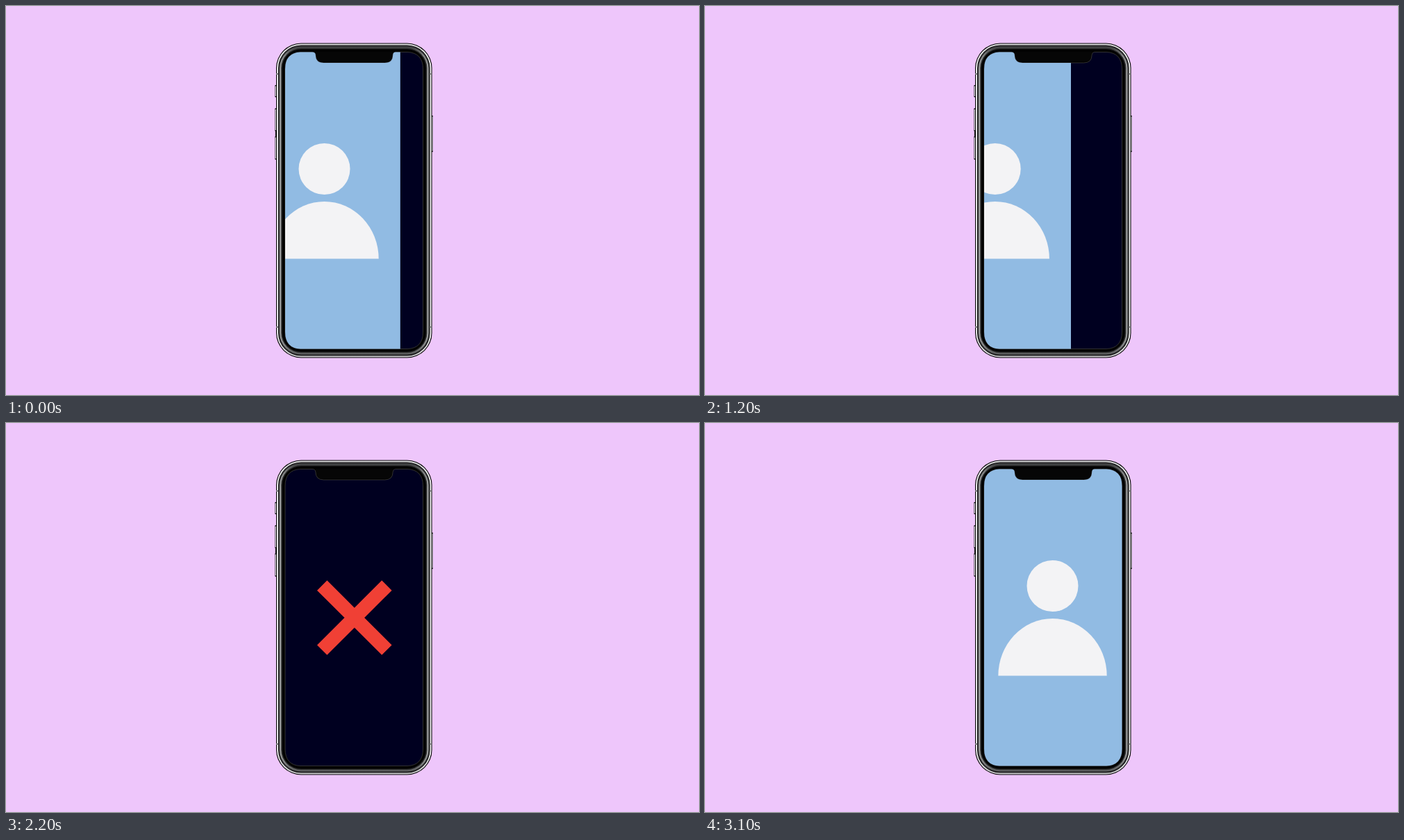
These frames come from a looping animation (998 px wide and 561 px high, 3.5 s). An HTML page:

```html
<!DOCTYPE html>
<html lang="en">
<head>
<meta charset="utf-8">
<title>Phone swipe</title>
<style>
  html, body { margin: 0; width: 100%; height: 100%; overflow: hidden; background: #eec6fb; }
  svg { display: block; width: 100%; height: 100%; }
</style>
</head>
<body>
<svg viewBox="0 0 998 561">
  <defs>
    <linearGradient id="steel" x2="0" y2="1">
      <stop offset="0" stop-color="#d8d8da"/>
      <stop offset=".06" stop-color="#f4f4f5"/>
      <stop offset=".94" stop-color="#f0f0f1"/>
      <stop offset="1" stop-color="#c8c8ca"/>
    </linearGradient>
    <linearGradient id="rim" x2="0" y2="1">
      <stop offset="0" stop-color="#3c3d3e"/>
      <stop offset=".03" stop-color="#8b8c8d"/>
      <stop offset=".08" stop-color="#a2a3a4"/>
      <stop offset=".92" stop-color="#a2a3a4"/>
      <stop offset=".97" stop-color="#8b8c8d"/>
      <stop offset="1" stop-color="#5a5b5c"/>
    </linearGradient>
    <path id="glass" d="M424 66.5H441Q445.500 66.500 445.800 70.500Q446 82 457.500 82H545.500Q557 82 557.200 70.500Q557.500 66.500 561 66.500H578Q600.500 67.500 600.500 91V470Q600.500 493.500 578 494.500H424Q402 493.500 402 470V91Q402 67.500 424 66.500Z"/>
    <clipPath id="screen"><use href="#glass"/></clipPath>
  </defs>
  <rect width="998" height="561" fill="#eec6fb"/>
  <g id="phone"></g>
  <use href="#glass" fill="#000020" stroke="#45453f" stroke-width=".7"/>
  <g clip-path="url(#screen)">
    <g id="card">
      <rect x="-109.300" y="60" width="218.600" height="440" fill="#91bbe3"/>
      <g fill="#f3f3f5">
        <circle cy="235" r="37"/>
        <path d="M-78.200 364.500A78.200 82.500 0 0 1 78.200 364.500Z"/>
      </g>
    </g>
    <path id="cross" d="M455.200 234.200L548.400 327.400M548.400 234.200L455.200 327.400" stroke="#f04035" stroke-width="20.300"/>
  </g>
</svg>
<script>
const phone = document.getElementById('phone');
const card = document.getElementById('card');
const cross = document.getElementById('cross');

function box(x, y, width, height, fill, rx = 0) {
  const rect = document.createElementNS('http://www.w3.org/2000/svg', 'rect');
  for (const [key, value] of Object.entries({ x, y, width, height, fill, rx })) {
    rect.setAttribute(key, value);
  }
  phone.append(rect);
}

// Side buttons: x, y, height
for (const [x, y, h] of [[387.3, 114, 17.5], [387.3, 147.5, 33], [387.3, 188, 33.5], [612.5, 158, 52.5]]) {
  box(x, y, 2.4, h, '#111', 0.8);
  box(x + 0.4, y + 1.5, 1.7, h - 3, '#d6cfda');
}
box(387.8, 179, 1.4, 10, '#222');

// Nested body layers: inset, fill
for (const [d, fill] of [
  [0, '#080808'], [1.1, 'url(#steel)'], [3, '#0b0b0b'],
  [4, '#38393a'], [5.2, 'url(#rim)'], [7.2, '#2c2d2d'], [8.8, '#020202']
]) box(389 + d, 53.5 + d, 224.6 - 2 * d, 454 - 2 * d, fill, 36 - d);

// Antenna bands
for (const y of [97, 462]) {
  box(389, y, 3.2, 2, '#77777a');
  box(610.4, y, 3.2, 2, '#77777a');
}
box(446, 66, 111, 14, '#060606');

const LOOP = 3500, TICK = 100;
const LEFT = 290.5, RIGHT = 713;

// Card centre over time; the card returns from the side it left by
const path = [
  [-100, 500.5], [400, LEFT], [900, LEFT], [1400, 502.5],
  [1700, 502.5], [2200, RIGHT], [2600, RIGHT], [3100, 500.5], [3400, 500.5], [3500, 458.5]
];

function centre(t) {
  const i = path.findIndex(([time]) => time > t);
  const [[t0, x0], [t1, x1]] = path.slice(i - 1, i + 1);
  return x0 + (x1 - x0) * (t - t0) / (t1 - t0);
}

function draw(now) {
  const t = Math.floor((now % LOOP) / TICK) * TICK;
  card.setAttribute('transform', `translate(${centre(t)} 0)`);
  const crossed = (t >= 500 && t < 900) || (t >= 2200 && t < 2600);
  cross.setAttribute('visibility', crossed ? 'visible' : 'hidden');
}

const start = performance.now();
function frame() {
  draw(performance.now() - start);
  requestAnimationFrame(frame);
}
frame();
</script>
</body>
</html>
```
